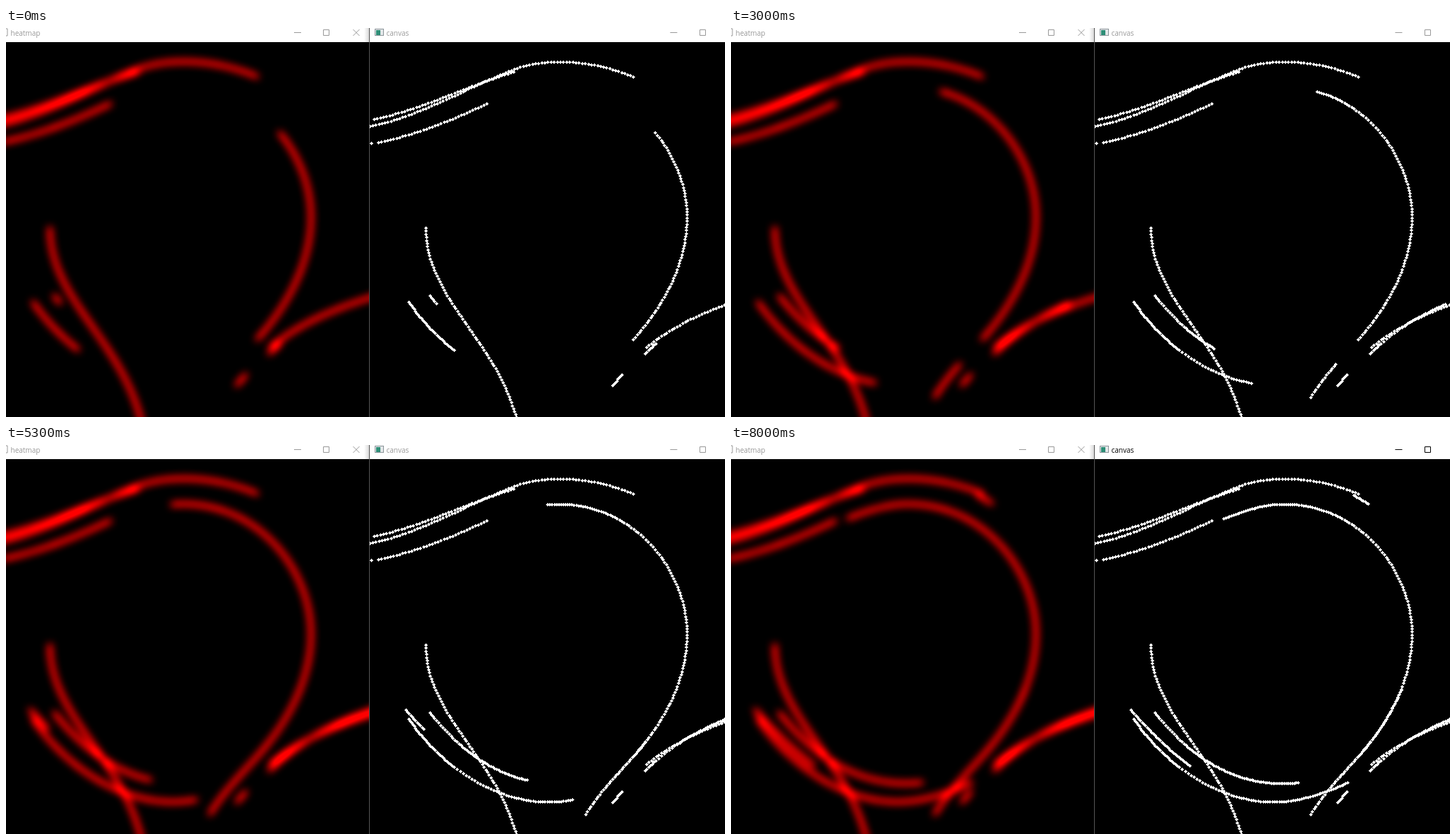
Write an HTML page with a canvas that moves like this. It is 1016 by 551 pixels and loops after 8100 ms.

```html
<!DOCTYPE html>
<html lang="en">
<head>
<meta charset="utf-8">
<title>heatmap and canvas</title>
<style>
  html, body { margin: 0; width: 1016px; height: 551px; overflow: hidden; background: #000; }
  canvas, svg { position: absolute; left: 0; top: 0; display: block; }
  text { font: 10px "Open Sans", "Noto Sans", sans-serif; fill: currentColor; }
  .icons { fill: none; stroke: currentColor; }
  .window { color: #999; }
  .active { color: #000; }
</style>
</head>
<body>
<canvas id="stage" width="1016" height="551"></canvas>
<svg width="1016" height="551">
  <defs>
    <linearGradient id="shade"><stop stop-opacity="0"/><stop offset="1" stop-opacity=".15"/></linearGradient>
  </defs>
  <rect width="1016" height="20" fill="#fff"/>
  <rect x="506" width="7" height="20" fill="url(#shade)"/>
  <rect x="513" width="1" height="551" fill="#555"/>
  <g class="window">
    <path d="M0 1h2v10H0" fill="none" stroke="#999"/>
    <text x="6.5" y="11">heatmap</text>
    <path class="icons" d="M407 6.5h10M448.5 2.5h8v8h-8zM490.5 2l9 9m0-9l-9 9"/>
  </g>
  <g class="window" id="front">
    <rect x="521.5" y="1.5" width="12" height="9" fill="#e4e8ea" stroke="#8b9499"/>
    <rect x="523" y="3" width="6" height="7" fill="#2f8f78"/>
    <text x="537.5" y="11">canvas</text>
    <path class="icons" d="M938.5 6.5h10M980.5 2.5h8v8h-8z"/>
  </g>
</svg>
<script>
const LOOP = 8100, TICK = 100, LAST = 71;
const SHIFT = 531, BAR = 20, SPLIT = 513, HEIGHT = 551;
const PAUSES = [1000, 2000, 2900, 3400, 4400, 5200, 5800, 6900, 7800];

const trails = [];

// Distance covered after n steps: a fast start settling to a steady pace.
const travel = n => 2.95 * n + 33 * (1 - Math.exp(-n / 14));

// The last `grown` pixels of the path appear one dot per step, from step `start` to LAST.
function trail(d, { gap = 4.4, grown = 0, start = 0 } = {}) {
  const path = document.createElementNS("http://www.w3.org/2000/svg", "path");
  path.setAttribute("d", d);
  const ready = Math.max(0, path.getTotalLength() - grown);
  const dots = [];
  const add = (length, born) => {
    const { x, y } = path.getPointAtLength(length);
    dots.push({ x, y, born });
  };

  const count = Math.max(1, Math.round(ready / gap));
  for (let i = 0; i <= count; i++) add(ready * i / count, start);
  if (grown) {
    const rest = path.getTotalLength() - ready;
    const span = travel(LAST) - travel(start);
    for (let n = start + 1; n <= LAST; n++) {
      add(ready + rest * (travel(n) - travel(start)) / span, n);
    }
  }
  trails.push(dots);
}

// Finished trails
trail("M505 141C585 126 650 84 718 58C764 41 830 45 886 69");
trail("M520 129C590 114 650 82 717 62");
trail("M516 163h0");
trail("M526 161.5C580 151 630 130 679 107");
trail("M593 283C593 385 694 440 723 560");
trail("M905 452C945 420 990 398 1065 376");
trail("M857 506L870 491", { gap: 3 });

// Growing trails
trail("M886 441C929 393 962 333 962 268C962 176 887 83.5 781 83.5C753 83.5 724 93 696 104", { grown: 244 });
trail("M569 388C615 455 690 505.5 767 505.5C800 505.5 838 494 871 478", { gap: 3.2, grown: 254 });
trail("M599 379C645 438 712 488 801 478", { gap: 3.2, grown: 222 });
trail("M903 461C940 424 1000 382 1137 350", { gap: 3.2, grown: 242 });
trail("M819 523C834 497 860 470 886 441C911 413 932.5 381 946.5 347", { grown: Infinity, start: 13 });
trail("M565 375C590 404 622 435 648 454", { grown: Infinity, start: 36 });
trail("M900 83L880 71", { grown: Infinity, start: 62 });

const ctx = stage.getContext("2d");
const layer = document.createElement("canvas");
layer.width = 1100;
layer.height = 580;
const ink = layer.getContext("2d");
ink.lineWidth = 3;
ink.lineCap = ink.lineJoin = "round";
ink.strokeStyle = "#fff";

function clearLayer() {
  ink.fillStyle = "#000";
  ink.fillRect(0, 0, layer.width, layer.height);
  ink.fillStyle = "#fff";
}

function diamond({ x, y }) {
  x = Math.round(x);
  y = Math.round(y);
  ink.fillRect(x - 2, y, 5, 1);
  ink.fillRect(x - 1, y - 1, 3, 3);
  ink.fillRect(x, y - 2, 1, 5);
}

function drawDots(visible) {
  clearLayer();
  visible.flat().forEach(diamond);
  ctx.drawImage(layer, 0, 0);
}

// Blurred lines: brighter where neighbours overlap, tinted red at the end.
function drawHeat(visible) {
  clearLayer();
  ink.beginPath();
  for (const dots of visible) {
    dots.forEach((p, i) => i ? ink.lineTo(p.x, p.y) : ink.moveTo(p.x, p.y));
    if (dots.length) ink.lineTo(dots.at(-1).x, dots.at(-1).y);
  }
  ink.stroke();

  ctx.save();
  ctx.beginPath();
  ctx.rect(0, BAR, SPLIT, HEIGHT - BAR);
  ctx.clip();
  ctx.filter = "blur(6px) brightness(2.8)";
  ctx.fillRect(0, 0, SPLIT, HEIGHT);
  ctx.drawImage(layer, -SHIFT, 0);
  ctx.filter = "none";
  ctx.globalCompositeOperation = "multiply";
  ctx.fillStyle = "#f00";
  ctx.fillRect(0, 0, SPLIT, HEIGHT);
  ctx.restore();
}

function draw(step) {
  const visible = trails.map(dots => dots.filter(p => p.born <= step));
  drawDots(visible);
  drawHeat(visible);
  front.classList.toggle("active", step === LAST);
}

const begin = performance.now();
let shown = -1;
function frame() {
  const t = (performance.now() - begin) % LOOP;
  const step = Math.floor(t / TICK) - PAUSES.filter(p => p <= t).length;
  if (step !== shown) draw(shown = step);
  requestAnimationFrame(frame);
}
frame();
</script>
</body>
</html>
```
